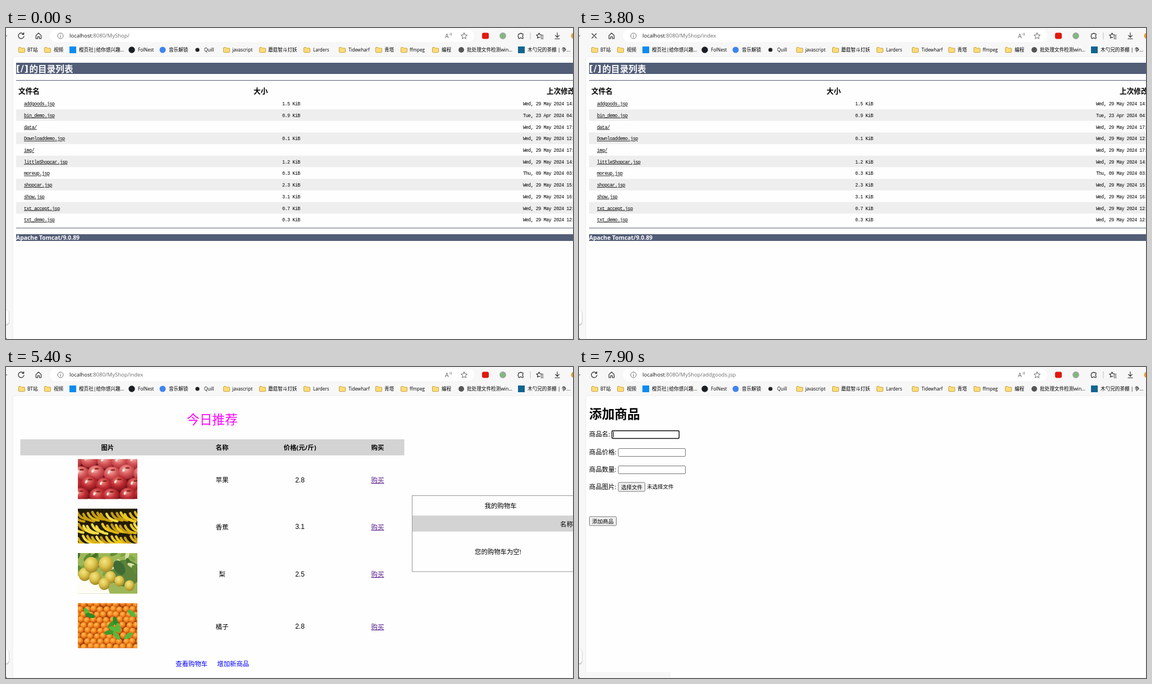
Write an HTML page that moves like this. It is 1010 by 555 pixels and loops after 8000 ms.

```html
<!DOCTYPE html>
<html lang="zh-CN">
<head>
<meta charset="utf-8">
<title>MyShop</title>
<style>
html, body { margin: 0; width: 100%; height: 100%; overflow: hidden; background: #f7f7f7 }
#stage { display: block }
text { font-family: "Open Sans", "Noto Sans CJK SC", "Noto Sans CJK", sans-serif; white-space: pre }
.b { font-weight: bold }
.c { text-anchor: middle }
.u { text-decoration: underline }
.mono { font-family: "Liberation Mono", monospace; font-size: 8.5px; letter-spacing: -.55px }
.num { font-family: "Liberation Sans", sans-serif }
.tahoma { font-family: "DejaVu Sans", sans-serif; letter-spacing: 1px }
.shade { filter: drop-shadow(0 2px 4px #0006) }
</style>
</head>
<body>
<svg id="stage" width="1010" height="555" viewBox="0 0 1010 555"></svg>
<script>
const stage = document.getElementById('stage');
const range = (n, f) => Array.from({length: n}, (_, i) => f(i)).join('');
const text = (x, y, s, size, attrs = '') => `<text x="${x}" y="${y}" font-size="${size}" ${attrs}>${s}</text>`;
const rect = (x, y, w, h, fill, attrs = '') => `<rect x="${x}" y="${y}" width="${w}" height="${h}" fill="${fill}" ${attrs}/>`;
const circle = (x, y, r, fill, attrs = '') => `<circle cx="${x}" cy="${y}" r="${r}" fill="${fill}" ${attrs}/>`;
const ellipse = (x, y, rx, ry, turn, fill) =>
  `<ellipse rx="${rx}" ry="${ry}" transform="translate(${x} ${y}) rotate(${turn})" fill="${fill}"/>`;
const icon = (x, y, d, color = '#333', width = 1.1, attrs = '') =>
  `<path transform="translate(${x} ${y})" d="${d}" fill="none" stroke="${color}" stroke-width="${width}" stroke-linejoin="round" stroke-linecap="round" ${attrs}/>`;
const group = (id, body, attrs = '') => `<g id="${id}" ${attrs}>${body}</g>`;
const glow = (id, light, mid, dark) => `<radialGradient id="${id}" cx=".4" cy=".32" r=".7">
  <stop stop-color="${light}"/><stop offset=".5" stop-color="${mid}"/><stop offset="1" stop-color="${dark}"/></radialGradient>`;
const star = r => 'M' + Array.from({length: 10}, (_, i) => {
  const a = Math.PI * (i / 5 - .5), q = i % 2 ? r * .48 : r;
  return (q * Math.cos(a)).toFixed(2) + ' ' + (q * Math.sin(a)).toFixed(2);
}).join('L') + 'Z';
const ring = r => `M${-r} 0a${r} ${r} 0 1 0 ${2 * r} 0a${r} ${r} 0 1 0 ${-2 * r} 0`;
const cross = r => `M${-r} ${-r}L${r} ${r}M${r} ${-r}L${-r} ${r}`;

let seed = 11;
const rnd = () => (seed = seed * 16807 % 2147483647) / 2147483647;
const pick = list => list[Math.floor(rnd() * list.length)];

// Browser toolbar and bookmarks
const bookmarks = [
  [22, 38, 'BT站'], [68, 85, '视频'], [113, 130, '橙页社|给你感兴趣...', 'blue'],
  [218, 235, 'FolNest', 'black'], [273, 290, '音乐解锁', 'sky'], [336, 353, 'Quill', 'dot'],
  [387, 403, 'javascript'], [451, 467, '蘑菇智斗灯妖'], [530, 547, 'Larders'],
  [593, 610, 'Tidewharf'], [658, 674, '青塔'], [703, 719, 'ffmpeg'], [759, 776, '编程'],
  [805, 821, '批处理文件检测win...', 'grey'], [912, 929, '木勺兄的茶棚 | 争...', 'teal']
];
const marks = {
  blue: rect(113, 33, 12, 12, '#0a8cf0'), black: circle(224, 39, 5.7, '#1b1f23'),
  sky: circle(279, 39, 5.5, '#3f83f0'), dot: circle(341, 39, 3.6, '#222'),
  grey: circle(811, 39, 5, '#555'), teal: rect(912, 33, 12, 12, '#12658f')
};
const folder = x => icon(x, 34, 'M.5 1.5q0-1 1-1h2.7l1.5 1.5h4.8q1 0 1 1v5.6q0 1-1 1h-9q-1 0-1-1z', '#b98d1e', .8, 'style="fill:#ffdc78"');
const bookmark = ([x, tx, s, mark]) => (mark ? marks[mark] : folder(x)) +
  text(tx, 42, s, /^[\w ]+$/.test(s) ? 8.1 : 8.6);

const toolbar = rect(0, 0, 1010, 555, '#f7f7f7') +
  icon(0, 14, 'M0 0H1.5', '#333') +
  group('reload', icon(27, 14, 'M4.2-2.9A5 5 0 1 0 5 .6M4.7-5.6V-2.6H1.7', '#222')) +
  group('stop', icon(27, 14, cross(4), '#222')) +
  icon(58, 14, 'M-4.6-.6L0-5 4.6-.6V5H1.5V1.5H-1.5V5H-4.6Z', '#222') +
  rect(848, 8.5, 12, 11, '#e0190c', 'rx="3" id="ext"') +
  circle(885, 14, 5.2, '#7dba7d', 'stroke="#a2a2a2" stroke-width="1.4"') +
  icon(917, 14, 'M-4-3.5H-1.5A1.7 1.7 0 0 1 1.7-3.5H4V-1A1.7 1.7 0 0 0 4 2V4.7H1.5A1.5 1.5 0 0 0-1.5 4.7H-4V2A1.6 1.6 0 0 1-4-1Z', '#222') +
  icon(934, 14, 'M0-5.5V6', '#c4c4c4') +
  icon(949.5, 14, star(5), '#222') + rect(951, 13, 7, 7, '#f7f7f7') +
  icon(951, 14, 'M2-1H6M1 2H6M2 5H6', '#222') +
  icon(982, 14, 'M0-5.5V2.5M-3.4-.8L0 2.6 3.4-.8M-4 5.3H4', '#222') +
  circle(1012, 14, 5.5, '#f09a2c') +
  rect(753, 30, 44, 19, '#e6e6e6', 'rx="4" id="hoverFolder"') +
  rect(906, 30, 100, 19, '#e6e6e6', 'rx="4" id="hoverSite"') +
  bookmarks.map(bookmark).join('') +
  rect(-10, 504, 15, 25, '#fff', 'rx="5" style="filter:drop-shadow(0 1px 1px #0006)"') +
  icon(0, 553.5, 'M0 0L1 1', '#555');

const pill = rect(78, 3, 756, 22, '#fff', 'rx="11" id="pill"') +
  icon(97, 14, ring(5), '#666', .9) + icon(97, 14, 'M0-.5V2.7M0-2.6V-2.5', '#666', 1) +
  text(782, 18, 'A', 10.5, 'fill="#666"') + icon(791, 11, 'M0-1.2Q1 0 0 1.4M2-2.2Q3.8 0 2 2.4', '#666', .8) +
  icon(816, 14.5, star(5.8), '#555', .9);

// Directory listing
const slate = '#525d76';
const files = [
  ['addgoods.jsp', '1.5', 'Wed, 29 May 2024 14:'], ['bin_demo.jsp', '0.9', 'Tue, 23 Apr 2024 04:'],
  ['data/', '', 'Wed, 29 May 2024 17:'], ['Downloaddemo.jsp', '0.1', 'Wed, 29 May 2024 12:'],
  ['img/', '', 'Wed, 29 May 2024 17:'], ['littleShopcar.jsp', '1.2', 'Wed, 29 May 2024 14:'],
  ['moreup.jsp', '0.3', 'Thu, 09 May 2024 03:'], ['shopcar.jsp', '2.3', 'Wed, 29 May 2024 15:'],
  ['show.jsp', '3.1', 'Wed, 29 May 2024 16:'], ['txt_accept.jsp', '0.7', 'Wed, 29 May 2024 12:'],
  ['txt_demo.jsp', '0.3', 'Wed, 29 May 2024 12:']
];
const fileRow = ([name, size, date], i) => {
  const y = 124.4 + 20.68 * i, base = y + 14;
  return (i % 2 ? rect(18, y, 992, 20.68, '#eee') : '') +
    text(32, base, name, 8.5, 'class="mono u"') +
    (size && text(492, base, size + ' KiB', 8.5, 'class="mono"')) +
    text(921, base, date, 8.5, 'class="mono"');
};
const listing = rect(18, 62, 992, 20, slate) +
  text(18, 78, '[/]', 15.5, 'class="b tahoma" fill="#fff"') +
  text(41.5, 78.5, '的目录列表', 15.6, 'class="b" fill="#fff"') +
  rect(18, 93, 992, 1, slate) +
  text(22, 116.6, '文件名', 12.7, 'class="b"') + text(441, 116.6, '大小', 12.7, 'class="b"') +
  text(963, 116.6, '上次修改时间', 12.7, 'class="b"') +
  files.map(fileRow).join('') + rect(18, 356.5, 992, 1, slate) +
  rect(18, 368, 992, 12, slate) + text(18, 377.8, 'Apache Tomcat/9.0.89', 10.4, 'class="b" fill="#fff"');

// Shop page with simplified fruit pictures
const photo = (y, h, body) => `<svg x="128" y="${y}" width="106" height="${h}">${body}</svg>`;
const skins = glow('pink', '#f6b3aa', '#d85a5c', '#a3262f') + glow('red', '#ec8a80', '#c22f35', '#7d1219') +
  glow('pear', '#f3e588', '#dcc34a', '#a08426') + glow('orange', '#ffc05c', '#f78a20', '#b94c0a');

const apples = rect(0, 0, 106, 71, '#6d1318') + range(20, i => {
  const row = Math.floor(i / 5), x = i % 5 * 27 + row % 2 * 13 - 8 + rnd() * 4, y = 2 + row * 20 + rnd() * 5;
  return ellipse(x, y, 15, 13, 0, row < 2 ? 'url(#pink)' : 'url(#red)') +
    ellipse(x + 1, y - 7, 4, 1.6, 0, '#8c2a20') + ellipse(x - 6, y - 3, 2, 3, 25, '#fbe3dc');
});
const bananas = rect(0, 0, 106, 63, '#221c06') + range(42, i => {
  const row = Math.floor(i / 14), x = i % 14 * 8.5 - 10 + rnd() * 3, y = 6 + row * 21 + rnd() * 5;
  return icon(x, y, 'M0 0Q4 11 19 13', pick(['#ecc91f', '#dcb414', '#f4dc45', '#c79c12']), 4.4);
});
const pears = rect(0, 0, 106, 73, '#9db758') + ellipse(20, 66, 38, 24, 20, '#fdfdf4') +
  ellipse(84, 36, 28, 24, 0, '#5c8338') +
  range(26, () => ellipse(rnd() * 106, rnd() * 34, 9, 3.5, rnd() * 180, pick(['#45702b', '#7fa544', '#d5e2a2', '#5f8c35']))) +
  ellipse(74, 26, 14, 9, 60, '#3f6b35') +
  [[12, 38, 11], [31, 45, 11], [24, 21, 13], [50, 20, 13], [58, 43, 10], [47, 55, 10], [74, 50, 9], [92, 58, 9]]
    .map(([x, y, r]) => ellipse(x, y, r, r * 1.08, 0, 'url(#pear)')).join('');
const oranges = rect(0, 0, 106, 80, '#96380a') + range(90, i => {
  const row = Math.floor(i / 10), x = i % 10 * 11.6 + row % 2 * 5.8 - 2 + rnd() * 2, y = row * 9.6 + rnd() * 2;
  return circle(x, y, 6, 'url(#orange)');
}) + [[16, 16, 60], [22, 22, 15], [60, 38, -45], [67, 32, 70], [72, 44, 80], [56, 52, -10], [69, 58, 50], [64, 46, 20], [90, 58, -35], [96, 18, 40]]
  .map(([x, y, a]) => ellipse(x, y, 9, 4, a, pick(['#3f9a2c', '#2f8a25', '#58b83c']))).join('');

const goods = [
  ['苹果', '2.8', 181, 71, apples, 218], ['香蕉', '3.1', 269, 62.5, bananas, 301.7],
  ['梨', '2.5', 348.5, 72.5, pears, 386], ['橘子', '2.8', 438, 80, oranges, 479.7]
];
const shop = text(322, 118.8, '今日推荐', 22.7, 'fill="#f0f"') + rect(25.5, 145.5, 684, 28.6, '#d3d3d3') +
  [[181, '图片'], [385, '名称'], [523.5, '价格(元/斤)'], [662, '购买']]
    .map(([x, s]) => text(x, 164.2, s, 11.4, 'class="b c"')).join('') +
  goods.map(([name, price, y, h, art, mid]) => photo(y, h, art) +
    text(385, mid + 4.4, name, 11.4, 'class="c"') + text(523.5, mid + 4, price, 12, 'class="c num"') +
    text(662, mid + 4.4, '购买', 11.4, 'class="c u" fill="#551a8b"')).join('') +
  text(302, 550.4, '查看购物车', 11.4, 'fill="#00f"') + text(376, 550.4, '增加新商品', 11.4, 'fill="#00f"') +
  rect(723.5, 246, 320, 135.5, 'none', 'stroke="#8a8a8a" stroke-width=".9"') + rect(724, 281.5, 300, 28.6, '#d3d3d3') +
  text(881, 268.4, '我的购物车', 11.4, 'class="c"') + text(987, 301, '名称', 11.4) +
  text(835, 350.8, '您的购物车为空!', 11.4);

// Form page
const box = (id, x, y, w, h, fill) => rect(x + .5, y + .5, w - 1, h - 1, fill, `id="${id}" rx="1.5" stroke="#767676"`);
const form = text(18, 91.6, '添加商品', 22.7, 'class="b"') +
  ['名', '价格', '数量', '图片'].map((s, i) => text(18, 124.3 + 31.2 * i, `商品${s}:`, 11.4)).join('') +
  box('name', 58, 113, 121, 15, '#fff') + box('price', 69.5, 145, 120.5, 15, '#fff') +
  box('count', 69.5, 176, 120.5, 15, '#fff') + box('file', 69.5, 205.5, 48.5, 17, '#efefef') +
  text(75, 217.6, '选择文件', 9.5) + text(121, 217.2, '未选择文件', 9.5) +
  box('send', 18, 266.5, 49, 17, '#efefef') + text(23.2, 278.6, '添加商品', 9.6) +
  group('focus', rect(58.7, 113.7, 119.6, 13.8, 'none', 'rx="2" stroke="#111" stroke-width="1.5"') + rect(61, 115.5, 1, 10, '#000'));

// Address suggestions and input method window
const favicon = (x, y) => rect(x, y, 11, 11, '#c9a86a');
const popup = rect(78, -10, 756, 124, '#fff', 'rx="7" class="shade"') +
  `<path d="M78 82H834V107q0 7-7 7H85q-7 0-7-7Z" fill="#f7f7f7"/>` +
  rect(78, 28, 756, 25, '#f0f0f0') + rect(78, 28, 2, 25, '#0f5fa6') +
  favicon(91, 8.5) + favicon(90.5, 35.5) +
  `<text x="113" y="44.7" font-size="9.8" fill="#333">今日推荐 - <tspan class="b" font-size="9.5" fill="#17508a">localhost:8080/MyShop/index</tspan></text>` +
  icon(819.5, 41, cross(4), '#555', .9) +
  icon(95, 66, ring(3.4) + 'M2.5 2.5L5.5 5.5', '#666', .9) +
  `<text x="113" y="70.3" font-size="9.5" fill="#222">localhost:8080/MyShop/<tspan id="query"></tspan><tspan fill="#767676"> - 麦雾 搜索</tspan></text>` +
  text(92, 101.3, '筛选搜索:', 8.7, 'fill="#767676"') +
  icon(151, 98, 'M-4.6-2.4A5.2 5.2 0 1 1-5.2 .8M-5-5V-2.2H-2.2M0-2.5V.5H2.2', '#444', .9) +
  text(162, 101.3, '历史记录', 8.7) + icon(223.5, 98.5, star(5.6), '#444', .9) + text(234, 101.3, '收藏夹', 8.7) +
  icon(287, 98, 'M-5-5H3V3H-5ZM5-3V5H-3', '#444', .9) + text(298, 101.3, '标签页', 8.7) +
  icon(817.5, 98, ring(4.3), '#555', 1.3, 'stroke-dasharray="2.4 1"') + icon(817.5, 98, ring(1.5), '#555', .9);

const ime = rect(221, 22, 128, 23, '#f9f9f9', 'rx="5" style="filter:drop-shadow(0 1px 2px #0004)"') +
  rect(224, 24, 44, 19, '#eeefee', 'rx="3"') + rect(224, 27.5, 2, 11, '#8d4a3a', 'rx="1"') +
  `<text x="232" y="37.2" font-size="9.8" fill="#222">1 <tspan id="candidate"></tspan></text>` +
  `<path d="M283.5 30.5V36.5L279 33.5ZM296 30.5V36.5L300.5 33.5Z" fill="#8a8a8a"/>` +
  icon(318.5, 33.5, 'M-5-4.5H5V4.5H-5Z', '#333', .9) +
  `<path d="M319.5 36.5l-3.3-3.6a2 2 0 0 1 3.3-2.4a2 2 0 0 1 3.3 2.4z" fill="#111"/>` +
  icon(339.5, 33, 'M-4-1.5L0 2.3 4-1.5', '#333');

const address = rect(113, 5.5, 0, 15.5, '#0a6cc4', 'id="selection"') +
  `<text id="url" x="113" y="17.4" font-size="9.5"><tspan id="host">localhost</tspan><tspan id="path"></tspan><tspan id="rest" fill="#fff"></tspan></text>` +
  rect(0, 19, 0, .9, '#333', 'id="composing"') + rect(0, 7, 1, 13, '#111', 'id="caret"');

const status = rect(12, 544, 151, 20, '#f7f7f7', 'rx="3"') +
  text(17, 556.5, 'localhost:8080/MyShop/addgoods.jsp', 8.2, 'fill="#666" id="statusText"');

const pageShape = 'M1010 51H18q-6 0-6 6V555H1010Z';
stage.innerHTML = `<defs>${skins}<clipPath id="view"><path d="${pageShape}"/></clipPath></defs>` + toolbar +
  `<path d="${pageShape}" fill="#fefefe" stroke="#ececec"/>` +
  `<g clip-path="url(#view)">${group('listing', listing) + group('shop', shop) + group('form', form) + group('status', status)}</g>` +
  pill + group('popup', popup) + address + group('ime', ime);

const el = {};
stage.querySelectorAll('[id]').forEach(e => el[e.id] = e);
const show = (id, on) => el[id].style.display = on ? '' : 'none';
const set = (id, attrs) => Object.entries(attrs).forEach(([k, v]) => el[id].setAttribute(k, v));

const keys = [2700, 2800, 2900, 3000, 3300];

function draw(t) {
  const within = (a, b) => t >= a && t < b;
  const typing = within(2700, 3800), composing = within(2700, 3500);
  const selected = within(1400, 1800);
  const loading = within(3800, 4800) || within(6500, 6900);
  const typed = 'index'.slice(0, keys.filter(k => t >= k).length);
  const rest = typing ? 'index'.slice(typed.length) : '';

  show('hoverSite', within(300, 400));
  show('hoverFolder', within(400, 500));
  show('reload', !loading);
  show('stop', loading);
  set('ext', {'fill-opacity': within(6800, 6900) ? .5 : 1});
  set('pill', {stroke: within(1400, 2700) ? '#0f6cbd' : 'none'});

  show('listing', t < 4700);
  show('shop', within(4700, 6800));
  show('form', t >= 6800);
  const scroll = Math.min(1, Math.max(0, (Math.floor(t / 100) - 51) / 3)) * 16.4;
  set('shop', {transform: `translate(0 ${-scroll})`});
  show('status', t >= 5900);
  set('status', {opacity: t < 6000 ? .5 : 1});
  show('statusText', t < 6500);

  el.path.textContent = ':8080/MyShop/' + (t < 6800 ? typed : 'addgoods.jsp');
  el.rest.textContent = rest;
  set('rest', {dx: rest ? 3 : 0});
  set('host', {fill: selected ? '#fff' : '#111'});
  set('path', {fill: selected ? '#fff' : '#6b6b6b'});
  const size = 9 + el.path.textContent.length;
  const end = 113 + el.url.getSubStringLength(0, size);
  show('selection', selected || rest);
  set('selection', selected ? {x: 113, width: end - 113}
    : {x: end + 3, width: rest ? el.url.getSubStringLength(size, rest.length) : 0});
  show('caret', within(1800, 2300) || typing);
  set('caret', {x: end + .3});
  show('composing', composing);
  if (composing) {
    const w = el.url.getSubStringLength(size - typed.length, typed.length);
    set('composing', {x: end - w, width: w});
  }

  show('popup', typing);
  show('ime', composing);
  el.query.textContent = el.candidate.textContent = typed;

  [['file', 7200], ['count', 7300], ['price', 7400], ['name', 7500]]
    .forEach(([id, at]) => set(id, {stroke: within(at, at + 100) ? '#4a4a4a' : '#767676'}));
  set('file', {fill: within(7200, 7300) ? '#e5e5e5' : '#efefef'});
  show('focus', t >= 7900);
}

const start = performance.now();
function loop() {
  draw((performance.now() - start) % 8000);
  requestAnimationFrame(loop);
}
loop();
</script>
</body>
</html>
```
